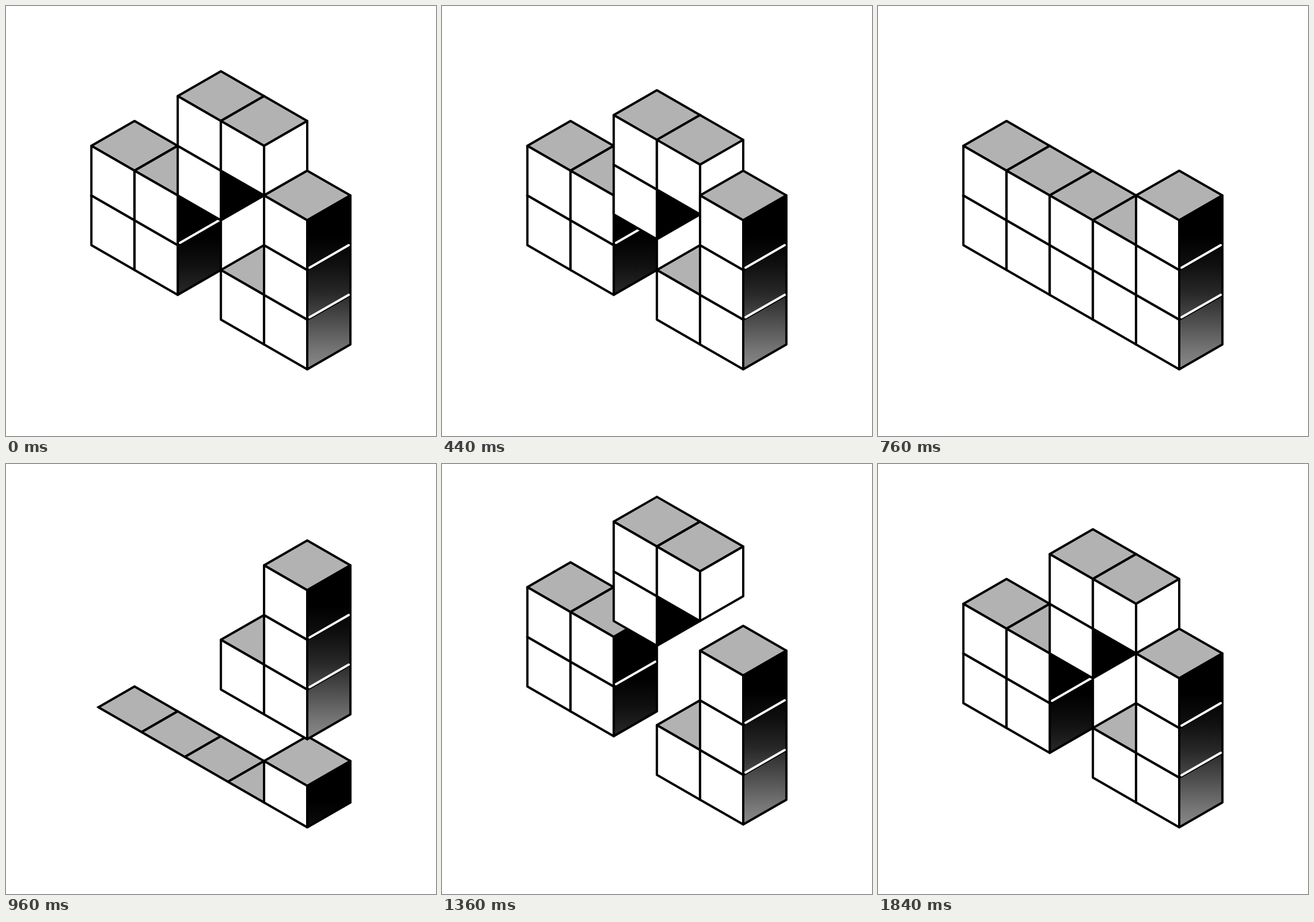
An HTML page with a canvas for the animation above (2 s loop, 748 px wide and 748 px high).

```html
<!DOCTYPE html>
<html lang="en">
<head>
<meta charset="utf-8">
<title>Isometric blocks</title>
<style>
  html, body { margin: 0; width: 100%; height: 100%; overflow: hidden; background: #fff; }
  canvas { display: block; width: 748px; height: 748px; }
</style>
</head>
<body>
<canvas id="stage" width="748" height="748"></canvas>
<script>
const ctx = document.getElementById('stage').getContext('2d');
const LOOP = 2000, STEP = 40, LAST = 1840;
const DX = 75.1, DY = 43.2, UNIT = 86.4;
const TOP = '#b2b2b2', STROKE = 4;

// Each cell is [column, row]; column -1 is the rightmost.
const square = { cells: [[-5, 0], [-5, 1], [-4, 0], [-4, 1]] };
const tall = { cells: [[-2, 0], [-1, 0], [-1, 1], [-1, 2]] };
const hook = {
  cells: [[-3, 0], [-3, 1], [-2, 1]],
  side: col => col === -2 ? '#fff' : '#000'
};

const SINK = { start: 764, span: 716 };
const FALL = { start: 131, span: 600 };
const ENTRIES = [
  { piece: tall, start: 835, span: 660, from: 3, to: 0 },
  { piece: square, start: 1080, span: 548, from: 2, to: 0 },
  { piece: hook, start: 1269, span: 582, from: 3, to: 2 }
];

const progress = (t, { start, span }) => Math.min(1, Math.max(0, (t - start) / span));
const easeIn = (p, power) => p ** power;
const easeOut = (p, power) => 1 - (1 - p) ** power;

// Column, depth and height to stage coordinates
const iso = (col, depth, h) => [
  524 + DX * (col + depth),
  632 + DY * (col - depth) - UNIT * h
];

// Side shading, fixed to the piece as it moves
function shade(lift) {
  const dy = -UNIT * lift;
  const g = ctx.createLinearGradient(0, 400 + dy, 0, 632 + dy);
  [[0, 0], [0.22, 16], [0.43, 40], [0.63, 76], [0.86, 118], [1, 138]]
    .forEach(([at, v]) => g.addColorStop(at, `rgb(${v},${v},${v})`));
  return g;
}

function trace(points) {
  ctx.beginPath();
  points.forEach(p => ctx.lineTo(...p));
}

function line(points, color) {
  trace(points);
  ctx.strokeStyle = color;
  ctx.lineWidth = STROKE;
  ctx.stroke();
}

function face(points, fill) {
  trace(points);
  ctx.closePath();
  ctx.fillStyle = fill;
  ctx.fill();
  ctx.strokeStyle = '#000';
  ctx.lineWidth = STROKE;
  ctx.stroke();
}

function drawCell({ col, row, lift, piece }) {
  const lo = row + lift, hi = lo + 1, end = col + 1;
  face([iso(col, 0, hi), iso(col, 1, hi), iso(end, 1, hi), iso(end, 0, hi)], TOP);
  face([iso(end, 0, hi), iso(end, 1, hi), iso(end, 1, lo), iso(end, 0, lo)],
    piece.side ? piece.side(col) : shade(lift));
  face([iso(col, 0, hi), iso(end, 0, hi), iso(end, 0, lo), iso(col, 0, lo)], '#fff');
  if (row > 0 && !piece.side) {
    const [x1, y1] = iso(end, 0, lo), [x2, y2] = iso(end, 1, lo);
    line([[x1 + 4, y1 - 4], [x2 - 3, y2]], '#fff');
  }
}

// Paint from left to right, then from bottom to top
function drawPieces(list) {
  list
    .flatMap(([piece, lift]) => piece.cells.map(([col, row]) => ({ col, row, lift, piece })))
    .sort((a, b) => a.col - b.col || a.row - b.row)
    .forEach(drawCell);
}

function drawSinking(depth) {
  if (3 - depth < 0.006) return;
  const edge = x => 634 - Math.abs(x - 524) * DY / DX;
  ctx.save();
  trace([[0, 0], [748, 0], [748, edge(748)], [524, 634], [0, edge(0)]]);
  ctx.clip();
  drawPieces([square, tall, hook].map(piece => [piece, -depth]));
  ctx.restore();
  const left = -5 + Math.max(0, depth - 2);
  line([iso(left, 0, 0), iso(0, 0, 0), iso(0, 1, 0)], '#000');
}

function draw(t) {
  ctx.fillStyle = '#fff';
  ctx.fillRect(0, 0, 748, 748);
  if (t < SINK.start) {
    const drop = easeIn(progress(t, FALL), 2.5);
    drawPieces([[square, 0], [tall, 0], [hook, 2 * (1 - drop)]]);
    return;
  }
  drawSinking(3 * easeOut(progress(t, SINK), 4));
  drawPieces(ENTRIES
    .filter(e => t > e.start)
    .map(e => [e.piece, e.from + (e.to - e.from) * easeOut(progress(t, e), 2.5)]));
}

ctx.lineJoin = ctx.lineCap = 'round';
const begin = performance.now();

function tick() {
  const t = (performance.now() - begin) % LOOP;
  draw(Math.min(LAST, Math.floor(t / STEP) * STEP));
  requestAnimationFrame(tick);
}
tick();
</script>
</body>
</html>
```
